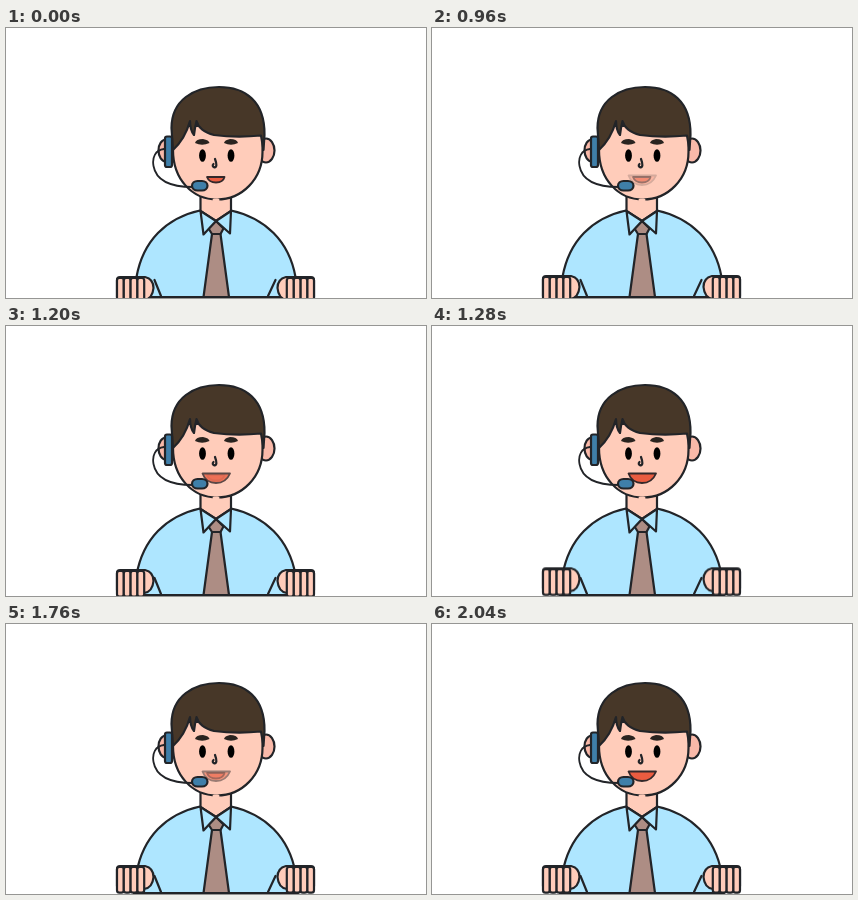
An HTML page for the animation above (2.28 s loop, 420x270 px).

```html
<!DOCTYPE html>
<html lang="en">
<head>
<meta charset="utf-8">
<title>Support agent</title>
<style>
html, body { margin: 0; width: 100%; height: 100%; overflow: hidden; background: #fff; }
svg { display: block; width: 420px; height: 270px; }
.line { stroke: #222428; stroke-width: 2.2; stroke-linejoin: round; stroke-linecap: round; }
.skin { fill: #ffccba; }
.ear { fill: #f9b9a9; }
.shirt { fill: #aee6ff; }
.tie { fill: #ad8d84; }
.blue { fill: #3f7fa9; }
.none { fill: none; }
.mouth { fill: #ea5c40; stroke: #33282a; stroke-width: 1.8; stroke-linejoin: round; }
</style>
</head>
<body>
<svg viewBox="0 0 420 270">
  <defs>
    <g id="fist" class="skin line">
      <path d="M114 242H139Q147.500 244 147.500 253Q146.500 264 138 265H114Q111 265 111 262V245Q111 242 114 242Z"/>
      <g id="fingers"></g>
    </g>
  </defs>

  <g class="line">
    <path class="shirt" d="M128 269L130.500 249C137 213 160 190 194 182.500L210 193L225 182.500C259 190 283 213 289.500 249L292 269Z"/>
    <path class="none" d="M148.500 252L155 268M269.500 252L262 268"/>
    <path class="skin" d="M194.500 166V183L210 193L225 183V166Z"/>
    <path class="tie" d="M206 206L197.500 269H223L214.500 206Z"/>
    <path class="tie" d="M210 193L217.500 200.500L214.500 206H206L202.500 200.500Z"/>
    <path class="shirt" d="M194.500 183L197.500 206.500L210 193ZM225 183L224 205.500L210 193Z"/>
    <path class="none" d="M148 269H271"/>
  </g>
  <g id="hands">
    <use href="#fist"/>
    <use href="#fist" transform="matrix(-1 0 0 1 419 0)"/>
  </g>

  <g class="line">
    <ellipse class="ear" cx="260" cy="122.500" rx="8.500" ry="12"/>
    <ellipse class="ear" cx="160" cy="122.500" rx="7.500" ry="11"/>
    <path class="skin" d="M167 98V122C167 151 186 171.500 211 171.500S256.500 151 256.500 124V98Z"/>
    <path class="none" d="M208 172H212" style="stroke: #ffccba; stroke-width: 3"/>
    <path fill="#473728" d="M167 122L165.500 100C165.500 72 188 59 213 59C239 59 259 73 258.500 107L257.500 122L255 107.500C239 109 224 109 208 107Q193 103 190.500 93Q189 99 188 107Q184 102 184 93Q179 111 167 122Z"/>
    <rect class="blue" x="159" y="108.500" width="7" height="30.500" rx="2"/>
    <path class="none" style="stroke-width: 1.800" d="M158 121C149 122 146 130 147.500 138C150 152 164 159 187 159"/>
  </g>
  <g fill="#29231f">
    <path d="M189 115Q190 111 197 111Q203 112 203.500 115Q196 118.500 189 115Z"/>
    <path d="M218 115Q218.500 112 224 111Q231 111 232 115Q225 118.500 218 115Z"/>
    <path class="line none" d="M209 131Q212 139 208.500 139.500Q205.500 138 207.500 136"/>
  </g>
  <ellipse cx="196.500" cy="127.500" rx="3.400" ry="6.300"/>
  <ellipse cx="225" cy="127.500" rx="3.400" ry="6.300"/>
  <path id="wide" class="mouth" d="M196.500 147.500H224Q220 157 210 157T196.500 147.500Z"/>
  <path id="small" class="mouth" d="M201 149H218.500Q217 154.500 210 154.500T201 149Z"/>
  <rect class="blue line" x="186" y="153" width="15.500" height="9.500" rx="5.500" ry="4.700"/>
</svg>
<script>
const LOOP = 2280, STEP = 40;
const byId = id => document.getElementById(id);

for (let i = 0; i < 4; i++) {
  const finger = document.createElementNS('http://www.w3.org/2000/svg', 'rect');
  const box = { x: 111 + i * 6.8, y: 243, width: 6.8, height: 25.7, rx: 2.5 };
  for (const key in box) finger.setAttribute(key, box[key]);
  byId('fingers').append(finger);
}

// Rows are [time, value]; values advance in 40 ms steps.
function play(id, style, rows) {
  const frames = rows.map(([time, value], i) => {
    const next = i + 1 < rows.length ? rows[i + 1][0] : LOOP;
    return {
      ...style(value),
      offset: time / LOOP,
      easing: `steps(${Math.round((next - time) / STEP)}, end)`
    };
  });
  frames.push({ ...style(rows[rows.length - 1][1]), offset: 1 });
  byId(id).animate(frames, { duration: LOOP, iterations: Infinity });
}

const drop = y => ({ transform: `translateY(${y}px)` });
const fade = opacity => ({ opacity });

play('hands', drop, [[0, 7], [880, 7], [1080, 4.5], [1280, .3], [1400, 0]]);
play('small', fade, [
  [0, 1], [840, 1], [880, .65], [1080, .2], [1280, 0], [1400, 0], [1600, .95], [1880, 0]
]);
play('wide', fade, [
  [0, 0], [880, 0], [1080, .5], [1280, 1], [1400, 1], [1600, .08], [1880, .8], [2040, 1]
]);
</script>
</body>
</html>
```
